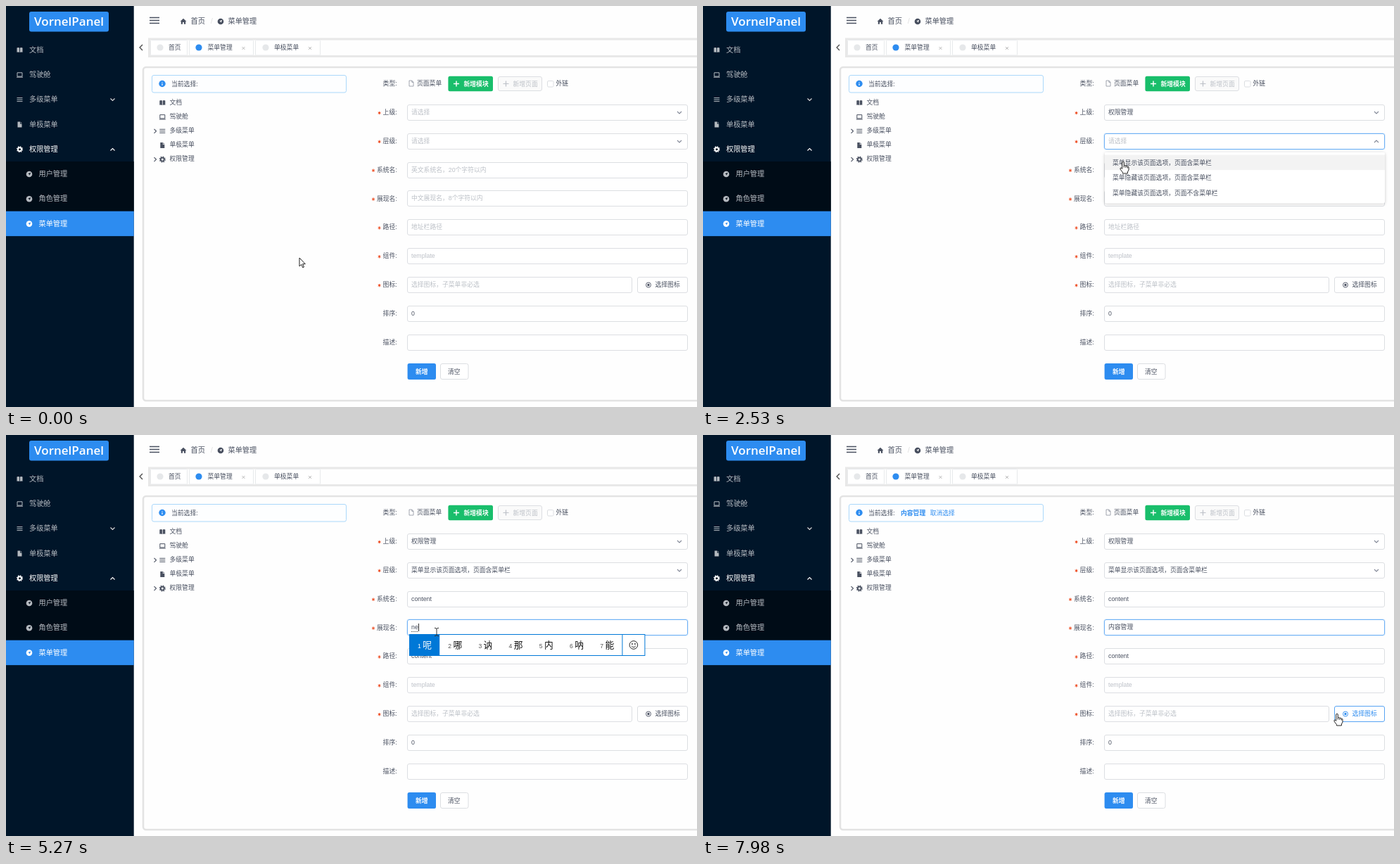
Write an HTML page that moves like this. It is 982x570 px and loops after 8 s.

```html
<!DOCTYPE html>
<html lang="zh-CN">
<head>
<meta charset="utf-8">
<title>菜单管理</title>
<style>
html,body{margin:0;width:100%;height:100%;overflow:hidden;background:#fefefe}
svg{display:block;width:982px;height:570px;font-family:"Liberation Sans","Noto Sans CJK SC","Noto Sans CJK",sans-serif}
text{white-space:pre}
</style>
</head>
<body>
<svg viewBox="0 0 982 570" xmlns="http://www.w3.org/2000/svg">
  <defs><filter id="shade" x="-5%" y="-10%" width="110%" height="125%">
    <feDropShadow dx="0" dy="1" stdDeviation="2" flood-opacity=".22"/>
  </filter></defs>
  <g id="page"></g>
  <g id="live"></g>
</svg>
<script>
const LOOP = 8000, S = 8.8;
const BLUE = '#2d8cf0', INK = '#495060', PALE = '#bcc0c7', LINE = '#dcdee2', SIDE = '#001529';
const pen = document.createElement('canvas').getContext('2d');
const widthOf = s => {
  pen.font = S + 'px "Liberation Sans","Noto Sans CJK SC","Noto Sans CJK",sans-serif';
  return pen.measureText(s).width;
};

// y is the optical middle of the line
const text = (x, y, s, fill = INK, size = S, more = '') =>
  `<text x="${x}" y="${(y + size * .36).toFixed(2)}" font-size="${size}" fill="${fill}" ${more}>${s}</text>`;
const box = (x, y, w, h, fill, stroke = 'none', r = 0, more = '') =>
  `<rect x="${x}" y="${y}" width="${w}" height="${h}" rx="${r}" fill="${fill}" stroke="${stroke}" ${more}/>`;
const dot = (x, y, r, fill, more = '') => `<circle cx="${x}" cy="${y}" r="${r}" fill="${fill}" ${more}/>`;
const line = (x, y, d, stroke, w = 1, more = '') =>
  `<path transform="translate(${x} ${y})" d="${d}" fill="none" stroke="${stroke}" stroke-width="${w}" ${more}/>`;
const shape = (x, y, d, fill, more = '') =>
  `<path transform="translate(${x} ${y})" d="${d}" fill="${fill}" ${more}/>`;
const down = (x, y, c, k = 3) => line(x, y, `M${-k} ${-k / 2}L0 ${k / 2}L${k} ${-k / 2}`, c, 1.1);
const up = (x, y, c, k = 3) => line(x, y, `M${-k} ${k / 2}L0 ${-k / 2}L${k} ${k / 2}`, c, 1.1);
const plus = (x, y, c, w) => line(x, y, 'M-4 0H4M0 -4V4', c, w);

const icon = {
  book: (x, y, c) => shape(x, y, 'M-4 -3Q-2 -4 -.4 -3V3.4Q-2 2.6 -4 3.3ZM4 -3Q2 -4 .4 -3V3.4Q2 2.6 4 3.3Z', c),
  screen: (x, y, c) => line(x, y, 'M-3.5 -3H3.5V2.3H-3.5ZM-4.5 3.4H4.5', c, 1),
  bars: (x, y, c) => line(x, y, 'M-4 -2.5H4M-4 0H4M-4 2.5H4', c, 1),
  file: (x, y, c) => shape(x, y, 'M-3 -4H.5V-1H3V4H-3ZM1.2 -4L3 -1.8H1.2Z', c),
  gear: (x, y, c) => dot(x, y, 2.5, 'none', `stroke="${c}" stroke-width="1.9"`) +
    dot(x, y, 3.9, 'none', `stroke="${c}" stroke-width="1.3" stroke-dasharray="1.53"`),
  compass: (x, y, c, hole) => dot(x, y, 4.3, c) + shape(x, y, 'M2.2 -2.2L.6 1.8L-.1 .1L-1.8 -.6Z', hole)
};

function sidebar() {
  const grey = '#b5bac0', items = [
    ['文档', 'book'], ['驾驶舱', 'screen'], ['多级菜单', 'bars'], ['单极菜单', 'file'],
    ['权限管理', 'gear'], ['用户管理'], ['角色管理'], ['菜单管理']];
  let s = box(0, 0, 181.7, 570, SIDE) + box(0, 221, 181.7, 71, '#000c17') + box(0, 291.7, 181.7, 35.4, BLUE) +
    box(33, 8, 113, 28.5, BLUE, 'none', 3) +
    text(89.5, 22, 'VornelPanel', '#fff', 17, 'text-anchor="middle" font-weight="600" style="font-family:\'Open Sans\',sans-serif"');
  items.forEach(([name, kind], i) => {
    const y = 62 + 35.3 * i, c = i === 4 || i === 7 ? '#fff' : grey;
    s += kind ? icon[kind](19.5, y + .5, c) : icon.compass(33, y + .5, c, i === 7 ? BLUE : '#000c17');
    s += text(kind ? 33 : 46.5, y, name, c, 10.2, i === 4 ? 'font-weight="500"' : '');
  });
  return s + down(151.5, 133, '#ddd') + up(151.5, 204, '#fff');
}

function header() {
  const cross = 'M-2 -2L2 2M2 -2L-2 2';
  return line(204, 20.5, 'M0 -4H14M0 0H14M0 4H14', INK, 1.5) +
    shape(252, 22, 'M0 -4.2L4.4 0H3.2V3.8H1V1H-1V3.8H-3.2V0H-4.4Z', INK) +
    text(262.5, 21.5, '首页', INK, 10.3) + text(291, 21.5, '/', '#ddd', 10) +
    icon.compass(305, 22, INK, '#fff') + text(315.5, 21.5, '菜单管理', INK, 10.2) +
    line(192, 59, 'M2 -4L-2 0L2 4', '#444', 1.2) +
    box(203.5, 47, 800, 24.5, '#fefefe', '#e8e8e8', 0, 'stroke-width="3"') +
    [[205.5, 52], [260.5, 91], [354.5, 92]].map(([x, w]) => box(x, 48.5, w, 21.5, '#fff', '#e8eaec', 1)).join('') +
    dot(219, 59, 4.6, '#e6e8ea') + dot(274, 59, 4.6, BLUE) + dot(369, 59, 4.6, '#e6e8ea') +
    text(231, 59, '首页') + text(286.5, 59, '菜单管理') + text(381, 59, '单极菜单') +
    line(337.5, 60, cross, '#aaa', .8) + line(432, 60, cross, '#aaa', .8);
}

function card() {
  let s = box(195, 87, 810, 474, '#fefefe', '#e3e3e3', 4, 'stroke-width="2.5"') +
    box(207.5, 98.5, 276, 24.5, '#fdfeff', '#abd8fb', 2.5) +
    dot(222, 110.5, 4.7, BLUE) + line(222, 110.5, 'M0 -2.5V-1.4M0 -.5V2.6', '#fff', 1.1) +
    text(235, 110.5, '当前选择:');
  [['文档', 'book'], ['驾驶舱', 'screen'], ['多级菜单', 'bars'], ['单极菜单', 'file'], ['权限管理', 'gear']]
    .forEach(([name, kind], i) => {
      const y = 136.7 + 20.15 * i;
      s += icon[kind](222.3, y + .8, INK) + text(232.5, y, name);
      if (kind === 'bars' || kind === 'gear') s += line(212, y + .8, 'M-1.5 -3L1.5 0L-1.5 3', INK, 1.1);
    });
  ['类型', '上级', '层级', '系统名', '展现名', '路径', '组件', '图标', '排序', '描述'].forEach((name, i) => {
    const y = 110 + 40.85 * i, x = name.length > 2 ? 527 : 535.6;
    s += text(x, y, name + ':');
    if (i > 0 && i < 8) s += line(x - 5, y + 1.2, 'M0 -2.2V2.2M-1.9 -1.1L1.9 1.1M-1.9 1.1L1.9 -1.1', '#ed4014', .9);
  });
  return s + line(576, 110, 'M-3 -4H.8L3 -1.6V4H-3ZM.8 -4V-1.6H3', '#8b919d', .8) + text(584, 110, '页面菜单') +
    box(628.4, 99.8, 63.6, 21.4, '#19be6b', 'none', 2.5) + plus(640, 110.5, '#fff', 1.4) +
    text(650.5, 110.5, '新增模块', '#fff', S, 'font-weight="700"') +
    box(699.5, 100.5, 62, 20, '#fafafa', LINE, 2.5) + plus(710.5, 110.5, PALE, 1.2) + text(720.5, 110.5, '新增页面', PALE) +
    box(769.5, 106.5, 8.5, 8.5, '#fff', LINE, 1.5) + text(781.5, 110, '外链') +
    box(570.6, 508, 40.4, 23, BLUE, 'none', 2.5) + text(582, 519.5, '新增', '#fff', S, 'font-weight="700"') +
    box(617.5, 508.5, 39.5, 22, '#fff', LINE, 2.5) + text(628, 519.5, '清空');
}

// time, x, y, kind (a arrow, h hand, i beam), pressed
const poses = [
  [0, 417, 358, 'a'], [100, 470, 300, 'a'], [220, 555, 215, 'a'], [340, 596, 160, 'h'], [460, 601, 146, 'h', 1],
  [600, 601, 146, 'h'], [820, 601, 196, 'h'], [890, 601, 216, 'h'], [1020, 600, 236, 'h'],
  [1220, 599, 245, 'h', 1], [1440, 599, 240, 'h'], [1550, 598, 228, 'h'], [1660, 597, 215, 'h'],
  [1780, 596, 205, 'h'], [1890, 596, 200, 'h'], [2000, 596, 200, 'h', 1], [2100, 596, 200, 'h'],
  [2210, 596, 207, 'h'], [2320, 597, 215, 'h'], [2430, 597, 221, 'h'], [2650, 597, 222, 'h', 1],
  [2870, 597, 222, 'h'], [2980, 597, 228, 'i'], [3090, 598, 231, 'i'], [3190, 598, 231, 'i', 1],
  [3300, 598, 231, 'i'], [3840, 604, 290, 'i'], [3950, 608, 313, 'i', 1], [4060, 609, 311, 'i'],
  [4170, 612, 280, 'i', 1], [4280, 612, 280, 'i']];

function pointer(t) {
  if (t >= 7230) {
    const u = (Math.floor((t - 7230 + 3) / 107.4) + 1) / 8, e = 1 - (1 - u) ** 2;
    return [t, 612 + 289 * e, 280 + 116 * e, u === 1 ? 'h' : 'i'];
  }
  return poses.filter(p => p[0] <= t).pop();
}

function drawPointer([, x, y, kind, pressed]) {
  const edge = 'stroke="#222" stroke-width="1" stroke-linejoin="round"';
  const art = {
    a: () => shape(x, y, 'M0 0V12L2.8 9.4L4.7 13.8L6.5 13L4.6 8.7H8.3Z', '#fff', edge),
    h: () => shape(x, y, 'M-1.3 1Q0 -1 1.3 1V6Q3 5 4 6.4Q5.6 5.6 6.4 7.2Q8 7 8 8.6V12L6.4 15V17H-.6V15.5L-4 11Q-4.6 9 -2.8 9L-1.3 10.4ZM1.3 6V8.5M4 6.4V9M6.4 7.2V9.5', '#fff', edge),
    i: () => line(x, y, 'M-3 -5.7Q0 -5.7 0 -4.2Q0 -5.7 3 -5.7M0 -4.5V4.5M-3 5.7Q0 5.7 0 4.2Q0 5.7 3 5.7', '#333', 1)
  };
  return (pressed ? dot(x - 1, y, 10.7, '#fff21c', 'opacity=".66"') : '') + art[kind]();
}

// input method: time, typed letters, candidates
const ime = [
  [5150, 'n', '你 那 呢 嗯 能 年 女'], [5260, 'ne', '呢 哪 讷 那 内 呐 能'], [5370, 'nei', '内 馁 那 哪 内 娞 氝'],
  [5480, "nei'r", '内容 内人 内 馁 那 哪 内'], [5590, "nei'ro", '内容 内肉 内 馁 那 哪 内'],
  [5690, "nei'ron", '内容 内 馁 那 哪 内 娞'], [5800, "nei'rong", '内容 内 馁 那 哪 内 娞'], [6020, ''],
  [6130, 'g', '个 过 给 高 国 更 该'], [6240, 'gu', '古 股 故 顾 骨 谷 鼓'], [6350, 'guan', '管 关 馆 官 观 惯 冠'],
  [6460, "guan'l", '管理 官僚 管 关 馆 官 观'], [6570, "guan'li", '管理 惯例 管 关 馆 官 观'], [6690, '']];

function drawIme(x, words) {
  const y = 283, h = 31;
  let cx = x, s = '';
  words.split(' ').forEach((word, i) => {
    const w = 30.4 + 12.8 * word.length, c = i ? '#111' : '#fff';
    if (!i) s += box(cx, y, w, h, '#0078d7');
    s += text(cx + 12, y + 17, i + 1, i ? '#555' : '#fff', 8.6) + text(cx + 19.2, y + 15.7, word, c, 12.8);
    cx += w;
  });
  const mx = cx + 16.5, my = y + 15.5;
  return box(x + .5, y + .5, cx - x + 32, h - 1, '#fff', '#0078d7') + s +
    line(cx + .5, y, 'M0 0V31', '#0078d7') + dot(mx, my, 5.8, 'none', 'stroke="#222"') +
    dot(mx - 2, my - 1.5, .9, '#222') + dot(mx + 2, my - 1.5, .9, '#222') + line(mx, my, 'M-3 1.3Q0 5 3 1.3', '#222', .9);
}

const hints = ['请选择', '请选择', '英文系统名，20个字符以内', '中文展现名，8个字符以内', '地址栏路径', 'template', '选择图标，子菜单非必选', '', ''];
const levels = ['菜单显示该页面选项，页面含菜单栏', '菜单隐藏该页面选项，页面含菜单栏', '菜单隐藏该页面选项，页面不含菜单栏'];
const lists = [
  { on: 600, off: 1330, row: 0, names: ['根目录', '多级菜单', '二级', '权限管理'] },
  { on: 2100, off: 2870, row: 1, names: levels }];
const focusSpan = [[460, 2100], [2100, 3300], [3190, 3950], [4280, LOOP], [3950, 4380]];
const rowTop = i => Math.round(140 + 40.86 * i - .2);
const within = (t, a, b) => t >= a && t < b;

function openness(t, { on, off }) {
  if (within(t, on, on + 80) || within(t, off, off + 110)) return .5;
  return within(t, on, off) ? 1 : 0;
}

function drawList(list, k, py) {
  if (!k) return '';
  const top = rowTop(list.row) + 27, h = list.names.length * 21.6 + 7.4;
  const over = Math.floor((py - 8 - top - 3.6) / 21.6);
  const rows = list.names.map((name, i) => {
    const y = top + 3.6 + 21.6 * i;
    return (i === over ? box(571, y, 398, 21.6, '#f3f3f3') : '') + text(582, y + 10.8, name);
  }).join('');
  return `<g opacity="${k}" transform="translate(0 ${top * (1 - k)}) scale(1 ${k})">` +
    box(571, top, 398, h, '#fff', 'none', 2.5, 'filter="url(#shade)"') + rows + '</g>';
}

function frame(t) {
  const p = pointer(t), [, px, py] = p;
  const open = lists.map(l => openness(t, l)), anyOpen = open.some(k => k);
  const typed = Math.min(7, Math.max(0, Math.floor((t - 3210) / 74)));
  const step = ime.filter(e => e[0] <= t).pop() || [0, ''];
  const done = t < 6020 ? '' : t < 6690 ? '内容' : '内容管理';
  const values = [t >= 1330 ? '权限管理' : '', t >= 2870 ? levels[0] : '', 'content'.slice(0, typed),
    done + step[1], t >= 4060 ? 'content' : '', '', '', '0', ''];
  let s = '';

  values.forEach((value, i) => {
    const y = rowTop(i) + .5, w = i === 6 ? 319 : 398, mid = y + 11;
    const focus = focusSpan[i] && within(t, ...focusSpan[i]);
    const hover = !anyOpen && px > 570 && px < 570 + w && Math.abs(py - mid) < 12;
    // the glow grows in after the field takes focus
    if (focus && t - focusSpan[i][0] >= 110) s += box(569.5, y - 1, w + 2, 24, 'none', BLUE, 3.5, 'stroke-opacity=".13"');
    s += box(570.5, y, w, 22, '#fff', focus || hover ? '#6fb1f5' : LINE, 2.5);
    s += text(576, mid - .3, value || hints[i], value ? INK : PALE);
    if (i < 2) s += (open[i] === 1 ? up : down)(957, mid, '#808695');
  });

  const hot = px > 897 && Math.abs(py - 396) < 12, tint = hot ? BLUE : INK;
  s += box(897.5, 385.5, 71, 22, '#fff', hot ? '#57a3f3' : LINE, 2.5) +
    dot(913, 396.5, 3.5, 'none', `stroke="${tint}" stroke-width=".9"`) + dot(913, 396.5, 1.7, tint) +
    text(922.5, 396.2, '选择图标', tint);

  if (done) {
    const label = 281 + widthOf(done);
    s += text(281, 110.5, done, BLUE, S, 'font-weight="700"') + text(label + 6.5, 110.5, '取消选择', BLUE);
  }

  const field = within(t, 3190, 3950) ? 2 : within(t, 3950, 4280) ? 4 : t >= 4280 ? 3 : -1;
  const blinkOff = within(t, 4810, 5150) || t >= 7230;
  if (field > 0 && !blinkOff) {
    const x = Math.round(576 + widthOf(values[field])) + .5;
    s += line(x, rowTop(field) + 6, 'M0 0V11', '#333', 1);
  }
  if (step[1]) {
    const x = 576 + widthOf(done);
    s += line(x, 279.5, `M0 0H${widthOf(step[1])}`, '#444', 1, 'stroke-dasharray="1 1"') +
      drawIme(Math.round(x - 3), step[2]);
  }
  lists.forEach((l, i) => s += drawList(l, open[i], py));
  return s + drawPointer(p);
}

document.getElementById('page').innerHTML = sidebar() + header() + card();
const live = document.getElementById('live');
let last = '';
function tick() {
  const next = frame(performance.now() % LOOP);
  if (next !== last) live.innerHTML = last = next;
  requestAnimationFrame(tick);
}
tick();
</script>
</body>
</html>
```
